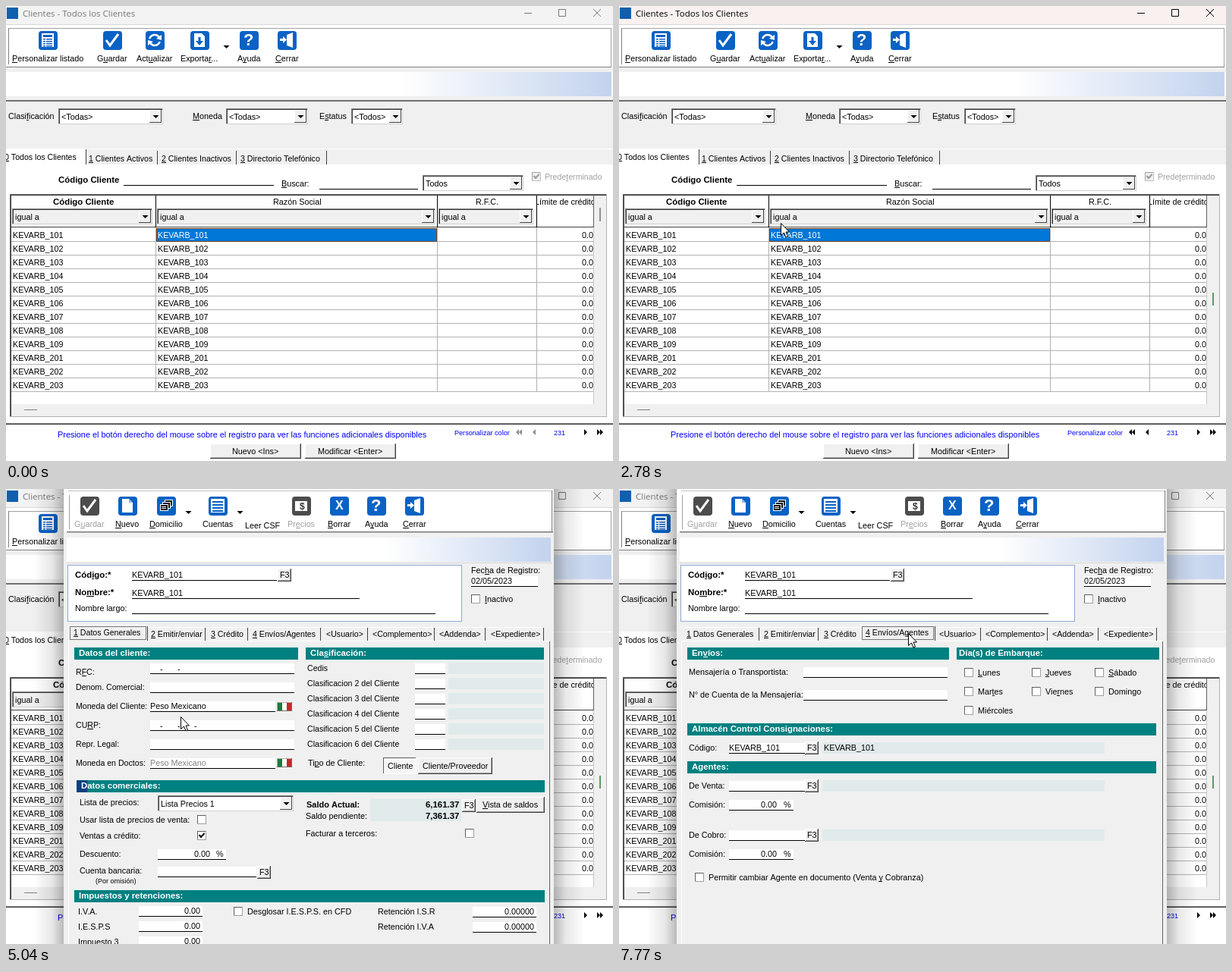
Animation of 800 by 600 pixels, one loop 8 s. Source, as an HTML page with a canvas:

```html
<!DOCTYPE html>
<html lang="es">
<head>
<meta charset="utf-8">
<title>Clientes</title>
<style>
html, body { margin: 0; width: 100%; height: 100%; overflow: hidden; background: #fff; }
canvas { display: block; }
</style>
</head>
<body>
<canvas id="stage" width="800" height="600"></canvas>
<script>
const g = document.getElementById('stage').getContext('2d');
const LOOP = 8000, GRAY = '#f0f0f0', TEAL = '#008080', BLUE = '#0a62c4', PALE = '#e0eaea';
const SANS = '"Liberation Sans", Arial, sans-serif';
const CODE = 'KEVARB_101';

// ---- primitives ----
function box(x, y, w, h, c) { g.fillStyle = c; g.fillRect(x, y, w, h); }
function hline(x1, x2, y, c = '#000') { box(x1, y, x2 - x1, 1, c); }
function vline(x, y1, y2, c = '#000') { box(x, y1, 1, y2 - y1, c); }
function poly(points, c) {
  g.beginPath();
  points.forEach(p => g.lineTo(...p));
  g.closePath();
  g.fillStyle = c;
  g.fill();
}
function stroke(c, w, path) {
  g.strokeStyle = c; g.lineWidth = w;
  g.beginPath(); path(); g.stroke();
}
// y is the middle of the line; "&" underlines the next letter
function text(s, x, y, o = {}) {
  const { c = '#000', size = 10.8, bold, align = 0, face = SANS } = o;
  g.font = `${bold ? 'bold ' : ''}${bold && !o.size ? 11.4 : size}px ${face}`;
  g.fillStyle = c;
  const mark = s.indexOf('&'), plain = s.replace('&', '');
  x = Math.round(x - g.measureText(plain).width * align);
  g.fillText(plain, x, y + 4);
  if (mark >= 0) {
    const left = g.measureText(plain.slice(0, mark)).width;
    box(Math.round(x + left), y + 5, Math.round(g.measureText(plain[mark]).width), 1, c);
  }
}
function bevel(x, y, w, h, light, dark, fill) {
  box(x, y, w, h, dark);
  box(x, y, w - 1, h - 1, light);
  box(x + 1, y + 1, w - 2, h - 2, fill);
}
function dotted(x, y, w, h, c = '#000') {
  g.setLineDash([1, 1]);
  stroke(c, 1, () => g.rect(x + .5, y + .5, w - 1, h - 1));
  g.setLineDash([]);
}
function clip(x, y, w, h, draw) {
  g.save();
  g.beginPath(); g.rect(x, y, w, h); g.clip();
  draw();
  g.restore();
}

// ---- widgets ----
function button(s, x, y, w, h) {
  bevel(x, y, w, h, '#fff', '#404040', GRAY);
  hline(x + 1, x + w - 1, y + h - 2, '#a0a0a0');
  vline(x + w - 2, y + 1, y + h - 1, '#a0a0a0');
  text(s, x + w / 2, y + (h >> 1), { align: .5 });
}
function f3(x, y) { button('F3', x, y, 18, 17); }
function arrowDown(x, y, r = 4) { poly([[x - r, y], [x + r, y], [x, y + r]], '#000'); }
function combo(s, x, y, w, fill = '#fff') {
  const h = 21;
  bevel(x, y, w, h, '#808080', '#d0d0d0', '#404040');
  box(x + 2, y + 2, w - 3, h - 3, fill);
  bevel(x + w - 18, y + 2, 16, h - 4, '#fff', '#404040', GRAY);
  arrowDown(x + w - 9.5, y + 9);
  text(s, x + 4, y + 11);
}
function check(x, y, on, c = '#000') {
  bevel(x, y, 12, 12, '#606060', '#a0a0a0', '#fff');
  if (on) stroke(c, 2, () => { g.moveTo(x + 2.5, y + 5); g.lineTo(x + 5, y + 8); g.lineTo(x + 9.5, y + 3); });
}
function checkLabel(s, x, y, on) { check(x, y - 6, on); text(s, x + 18, y); }
function field(x1, x2, y, s = '', right) {
  box(x1, y - 13, x2 - x1, 13, '#fff');
  hline(x1, x2, y);
  if (s) text(s, right || x1, y - 7, { align: right ? 1 : 0 });
}
function heading(s, x1, x2, y) {
  box(x1, y, x2 - x1, 16, TEAL);
  text(s, x1 + 6, y + 7, { bold: 1, c: '#fff' });
}
function banner(x1, x2, y, from) {
  const f = g.createLinearGradient(from, 0, x2, 0);
  f.addColorStop(0, '#fff');
  f.addColorStop(1, '#c3d3ee');
  box(x1, y, x2 - x1, 32, f);
}

// ---- toolbar glyphs, centred on 0,0 ----
const glyphs = {
  list() {
    box(-8, -9, 16, 18, '#fff');
    box(-6, -7, 12, 3, BLUE);
    for (let y = -2; y < 8; y += 3) { box(-6, y, 3, 1.5, BLUE); box(-2, y, 8, 1.5, BLUE); }
  },
  check() { stroke('#fff', 3, () => { g.moveTo(-8, 0); g.lineTo(-3, 7); g.lineTo(8, -8); }); },
  refresh() {
    stroke('#fff', 2.5, () => g.arc(0, 0, 7, 3.4, 5.9));
    stroke('#fff', 2.5, () => g.arc(0, 0, 7, .3, 2.8));
    poly([[9, -7], [9, 0], [2, -2]], '#fff');
    poly([[-9, 7], [-9, 0], [-2, 2]], '#fff');
  },
  export() {
    poly([[-7, -9], [3, -9], [7, -5], [7, 9], [-7, 9]], '#fff');
    box(-1.5, -4, 3, 6, BLUE);
    poly([[-5, 1], [5, 1], [0, 7]], BLUE);
  },
  help() { text('?', 0, 3, { bold: 1, size: 22, c: '#fff', align: .5 }); },
  exit() {
    poly([[0, -7], [8, -10], [8, 10], [0, 7]], '#fff');
    box(-9, -2, 7, 3, '#fff');
    poly([[-5, -5], [0, -.5], [-5, 4]], '#fff');
  },
  page() {
    poly([[-7, -9], [2, -9], [7, -4], [7, 9], [-7, 9]], '#fff');
    poly([[2, -9], [2, -4], [7, -4]], '#8fb6e6');
  },
  cards() {
    for (let i = 0; i < 3; i++) bevel(-2 - i * 3, -8 + i * 3, 11, 9, '#fff', '#fff', '#111');
    box(-6, 1, 6, 1, '#fff'); box(-6, 3, 6, 1, '#fff');
  },
  lines() {
    box(-9, -9, 18, 18, '#fff');
    for (let y = -6; y < 8; y += 4) box(-7, y, 14, 2, BLUE);
  },
  money() {
    box(-8, -6, 16, 13, '#fff');
    text('$', 1, 1, { bold: 1, size: 12, c: '#333', align: .5 });
  },
  cross() { text('X', 0, 1, { bold: 1, size: 16, c: '#fff', align: .5 }); }
};
function tool(kind, label, x, y, o = {}) {
  g.save();
  g.translate(x, y);
  g.fillStyle = o.off ? '#4c4c4c' : BLUE;
  g.beginPath(); g.roundRect(-12, -12, 25, 25, 4); g.fill();
  glyphs[kind]();
  g.restore();
  text(label, x, y + 24, { align: .5, c: o.off ? '#a0a0a0' : '#000' });
}

// ---- main window ----
function mainWindow(active, clicked) {
  const ink = active ? '#000' : '#777';
  box(0, 0, 800, 600, '#fff');
  box(0, 0, 800, 24, active ? '#f8f1f0' : '#f3f3f3');
  box(1, 2, 15, 15, '#0f5fae');
  text('Clientes - Todos los Clientes', 22, 10, { size: 11.5, c: ink, face: '"Open Sans", sans-serif' });
  hline(683, 693, 9, ink);
  stroke(ink, 1, () => {
    g.rect(728.5, 4.5, 9, 9);
    g.moveTo(774, 4); g.lineTo(784, 14);
    g.moveTo(784, 4); g.lineTo(774, 14);
  });

  hline(0, 800, 24, '#d8d8d8');
  hline(3, 797, 29, '#a0a0a0');
  vline(3, 29, 77, '#808080');
  vline(797, 29, 80, '#a0a0a0');
  hline(0, 798, 80, '#808080');
  box(0, 81, 800, 6, GRAY);
  tool('list', '&Personalizar listado', 55, 45);
  tool('check', 'G&uardar', 140, 45);
  tool('refresh', 'Act&ualizar', 196, 45);
  tool('export', 'Exporta&r...', 255, 45);
  arrowDown(290.5, 52);
  tool('help', 'A&yuda', 320, 45);
  tool('exit', '&Cerrar', 370, 45);
  banner(0, 798, 87, 520);
  box(0, 119, 800, 5, GRAY);
  box(0, 124, 800, 2, '#707070');

  box(0, 126, 800, 84, GRAY);
  text('Clasi&ficación', 3, 145);
  combo('<Todas>', 69, 135, 138);
  text('&Moneda', 246, 145);
  combo('<Todas>', 290, 135, 108);
  text('E&status', 413, 145);
  combo('<Todos>', 455, 135, 68);

  hline(0, 800, 188, '#fff');
  box(0, 188, 106, 22, '#fff');
  vline(105, 189, 209, '#404040');
  const size = 10.6;
  text('&0 Todos los Clientes', -2, 199, { size });
  [['&1 Clientes Activos', 109, 199], ['&2 Clientes Inactivos', 205, 303], ['&3 Directorio Telefónico', 309, 422]]
    .forEach(([s, x, end]) => { text(s, x, 201, { size }); vline(end, 191, 209, '#404040'); });
  hline(106, 800, 209, '#fff');

  text('Código Cliente', 69, 229, { bold: 1 });
  hline(155, 353, 236);
  text('&Buscar:', 363, 234);
  hline(413, 543, 241);
  combo('Todos', 549, 223, 133);
  bevel(693, 219, 12, 12, '#a0a0a0', '#c0c0c0', GRAY);
  stroke('#999', 2, () => { g.moveTo(695.5, 224); g.lineTo(698, 227); g.lineTo(702.5, 222); });
  text('Prede&terminado', 710, 225, { c: '#a0a0a0', size });

  grid(clicked);
  hline(0, 800, 550, '#808080');
  hline(0, 800, 551, '#404040');
  const blue = { c: '#0000ff' };
  text('Presione el botón derecho del mouse sobre el registro para ver las funciones adicionales disponibles', 68, 565, { ...blue, size: 10.9 });
  text('Personalizar color', 591, 562, { ...blue, size: 9.1 });
  text('231', 722, 562, { ...blue, size: 9 });
  const nav = (x, dir, c) => poly([[x, 558], [x + 4 * dir, 562], [x, 566]], c);
  const back = clicked ? '#000' : '#909090';
  nav(676, -1, back); nav(680, -1, back); nav(698, -1, back);
  nav(762, 1, '#000'); nav(779, 1, '#000'); nav(783, 1, '#000');
  button('Nuevo <Ins>', 269, 577, 120, 20);
  button('Modificar <Enter>', 394, 577, 120, 20);
}

function grid(clicked) {
  bevel(5, 248, 787, 294, '#606060', '#b0b0b0', '#fff');
  hline(6, 791, 249, '#404040');
  vline(6, 249, 541, '#404040');
  box(775, 250, 16, 291, GRAY);
  box(7, 525, 784, 16, GRAY);
  text('Código Cliente', 102, 258, { bold: 1, align: .5 });
  text('Razón Social', 384, 258, { align: .5 });
  text('R.F.C.', 634, 258, { align: .5 });
  clip(700, 250, 74, 270, () => {
    text('Límite de crédito', 737, 258, { align: .5 });
    for (let i = 0; i < 12; i++) text('0.00', 759, 302 + i * 18);
  });
  [[8, 185], [199, 367], [570, 125]].forEach(([x, w]) => combo('igual a', x, 267, w, GRAY));
  hline(7, 775, 291, '#404040');
  [197, 568, 699].forEach(x => { vline(x, 250, 292, '#000'); vline(x, 292, 509, '#b0b0b0'); });
  vline(774, 250, 292, '#606060');
  for (let i = 0; i < 12; i++) hline(7, 774, 310 + i * 18, '#b4b4b4');
  bevel(198, 293, 370, 18, '#000', '#000', '#0078d7');
  dotted(198, 293, 370, 18, '#ff8728');
  for (let i = 0; i < 12; i++) {
    const name = 'KEVARB_' + (i < 9 ? 101 + i : 192 + i), y = 302 + i * 18;
    text(name, 9, y, { size: 10.7 });
    text(name, 200, y, { size: 10.7, c: i ? '#000' : '#fff' });
  }
  vline(774, 292, 525, '#c8c8c8');
  hline(24, 41, 532, '#808080');
  if (clicked) box(782, 378, 2, 17, '#5a9a62');
  else box(782, 266, 2, 18, '#909090');
}

// ---- customer dialog ----
function shadow() {
  [[76, 36], [722, 762]].forEach(([x1, x2]) => {
    const f = g.createLinearGradient(x1, 0, x2, 0);
    f.addColorStop(0, 'rgba(0,0,0,.27)');
    f.addColorStop(.4, 'rgba(0,0,0,.09)');
    f.addColorStop(1, 'rgba(0,0,0,0)');
    box(Math.min(x1, x2), 0, 40, 600, f);
  });
}
function dialogTools() {
  vline(83, 8, 53, '#a0a0a0');
  tool('check', 'G&uardar', 110, 22, { off: 1 });
  tool('page', '&Nuevo', 160, 22);
  tool('cards', '&Domicilio', 211, 22);
  arrowDown(240.5, 29);
  tool('lines', 'Cuentas', 279, 22);
  arrowDown(308.5, 29);
  text('Leer CSF', 338, 48, { align: .5 });
  tool('money', 'Pr&ecios', 389, 22, { off: 1 });
  tool('cross', '&Borrar', 439, 22);
  tool('help', 'A&yuda', 488, 22);
  tool('exit', '&Cerrar', 538, 22);
}
function blankDialog() {
  shadow();
  box(76, 0, 646, 600, '#fff');
  box(85, 204, 629, 396, '#efefee');
  dialogTools();
}
function dialogHead() {
  box(76, 0, 646, 600, GRAY);
  box(77, 0, 643, 57, '#fff');
  hline(82, 720, 2, '#c0c0c0');
  vline(719, 2, 57, '#808080');
  hline(80, 721, 56, '#707070');
  hline(80, 721, 57, '#c0c0c0');
  dialogTools();
  banner(80, 718, 64, 500);
  hline(80, 720, 97, '#d8d8d8');
  bevel(81, 100, 520, 75, '#8fa9d4', '#8fa9d4', '#fff');
  text('Cód&igo:*', 91, 113, { bold: 1 });
  field(166, 357, 120, CODE);
  f3(358, 105);
  text('No&mbre:*', 91, 136, { bold: 1 });
  field(166, 466, 144, CODE);
  text('Nombre largo:', 91, 157);
  field(166, 566, 164);
  text('Fec&ha de Registro:', 613, 107);
  field(613, 701, 128, '02/05/2023');
  checkLabel('&Inactivo', 613, 145);
}

const tabs = [
  ['&1 Datos Generales', 89, 185], ['&2 Emitir/enviar', 191, 263], ['&3 Crédito', 270, 319],
  ['&4 Envíos/Agentes', 325, 415], ['<Usuario>', 422, 477], ['<Complemento>', 483, 565],
  ['<Addenda>', 571, 632], ['<Expediente>', 639, 709]
];
function dialogTabs(sel) {
  hline(82, 717, 200, '#fff');
  vline(82, 200, 600, '#fff');
  vline(716, 201, 600, '#606060');
  tabs.forEach(([s, x, end], i) => {
    const on = i === sel;
    if (on) {
      box(x - 7, 179, end - x + 9, 22, GRAY);
      hline(x - 6, end, 179, '#fff');
      vline(x - 7, 180, 201, '#fff');
      vline(end + 1, 181, 200, '#404040');
      dotted(x - 5, 181, end - x + 5, 18);
    } else {
      vline(end - 1, 183, 200, '#404040');
      hline(x - 4, end - 2, 182, '#fff');
    }
    text(s, x, on ? 189 : 191, { size: 10.6 });
  });
}

function flag(x, y) {
  bevel(x, y, 20, 12, '#b0b0a0', '#707060', '#fff');
  box(x + 1, y + 1, 6, 10, '#1c7a3c');
  box(x + 13, y + 1, 6, 10, '#c62828');
}
function generalPage() {
  heading('Datos del cliente:', 90, 385, 209);
  [['R&FC:', 380], ['Denom. Comercial:', 380], ['Moneda del Cliente:', 355], ['CU&RP:', 380],
   ['Repr. Legal:', 380], ['Moneda en Doctos:', 355]].forEach(([s, end], i) => {
    text(s, 92, i ? 236 + 25 * i : 241, { size: 10.6 });
    field(190, end, 243 + 25 * i);
  });
  [[203, 237], [226, 237], [203, 312], [226, 312], [248, 312]].forEach(([x, y]) => text('-', x, y));
  text('Peso Mexicano', 190, 286);
  text('Peso Mexicano', 190, 361, { c: '#808080' });
  flag(357, 281);
  flag(357, 355);

  heading('Cla&sificación:', 395, 709, 209);
  for (let i = 0; i < 6; i++) {
    const y = 236 + 20 * i;
    text(i ? `Clasificacion ${i + 1} del Cliente` : 'Cedis', 397, y, { size: 10.6 });
    field(539, 579, y + 7);
    box(583, y - 7, 126, 15, PALE);
  }
  text('Ti&po de Cliente:', 398, 361);
  bevel(497, 354, 44, 22, '#606060', '#fff', '#f6f6f6');
  text('Cliente', 520, 365, { align: .5 });
  button('Cliente/Proveedor', 543, 354, 98, 22);

  heading('', 93, 710, 384);
  box(93, 384, 14, 16, '#0a4080');
  text('Datos comerciales:', 99, 391, { bold: 1, c: '#fff' });
  text('Lista de precios:', 97, 413);
  combo('Lista Precios 1', 200, 404, 179);
  text('Usar lista de precios de venta:', 97, 436);
  check(252, 430);
  text('Ventas a crédito:', 97, 457);
  check(252, 451, 1);
  text('Descuento:', 97, 481);
  field(200, 290, 488, '0.00', 269);
  text('%', 277, 481);
  text('Cuenta bancaria:', 97, 503);
  field(200, 330, 511);
  f3(331, 497);
  text('(Por omisión)', 118, 516, { size: 9 });
  text('Saldo Actual:', 396, 416, { bold: 1, size: 11 });
  text('Saldo pendiente:', 395, 431);
  box(480, 409, 120, 29, PALE);
  text('6,161.37', 597, 416, { bold: 1, align: 1 });
  text('7,361.37', 597, 431, { bold: 1, align: 1 });
  f3(601, 409);
  button('&Vista de saldos', 620, 406, 90, 21);
  text('Facturar a terceros:', 395, 454);
  check(605, 448);

  heading('Impuestos y retenciones:', 90, 710, 529);
  ['I.V.A.', 'I.E.S.P.S', 'Impuesto 3'].forEach((s, i) => {
    text(s, 95, 557 + 20 * i);
    field(175, 259, 563 + 20 * i, '0.00', 256);
  });
  checkLabel('Desglosar I.E.S.P.S. en CFD', 300, 557);
  ['Retención I.S.R', 'Retención I.V.A'].forEach((s, i) => {
    text(s, 490, 557 + 20 * i);
    field(615, 699, 564 + 20 * i, '0.00000', 696);
  });
}
function shippingPage() {
  heading('En&víos:', 90, 435, 209);
  text('Mensajería o Transportista:', 92, 241);
  field(243, 433, 248);
  text('N° de Cuenta de la Mensajería:', 92, 271);
  field(243, 433, 278);
  heading('', 445, 712, 209);
  text('Día(s) de Embarque:', 448, 216, { bold: 1, c: '#fff' });
  ['&Lunes', 'Mar&tes', 'Miércoles', '&Jueves', 'Vie&rnes', '', '&Sábado', 'Domingo'].forEach((s, i) => {
    if (s) checkLabel(s, [455, 544, 627][i / 3 | 0], 242 + 25 * (i % 3));
  });
  heading('Almacén Control Consignaciones:', 90, 708, 309);
  text('Código:', 92, 341);
  heading('Agentes:', 90, 708, 359);
  [[341, CODE], [391, ''], [456, '']].forEach(([y, s]) => {
    field(145, 245, y + 7, s);
    f3(245, y - 8);
    box(268, y - 7, 372, 15, PALE);
    if (s) text(s, 270, y);
  });
  [['De Venta:', 391], ['De Cobro:', 456]].forEach(([s, y]) => {
    text(s, 92, y);
    text('Comisión:', 92, y + 25);
    field(145, 230, y + 32, '0.00', 208);
    text('%', 217, y + 25);
  });
  checkLabel('Permitir cambiar Agente en documento (Venta &y Cobranza)', 100, 512);
}

// ---- pointer: time, x, y ----
const path = [
  [1070, 441, 567], [1310, 241, 296], [1510, 241, 296], [1650, 227, 297], [1840, 227, 297], [1850, 226, 299],
  [2050, 226, 299], [2180, 227, 314], [2260, 227, 314], [2780, 213, 286], [2890, 213, 286], [2900, 225, 290],
  [3110, 226, 297], [3250, 218, 289], [3710, 230, 300], [5640, 230, 300], [5980, 234, 202], [6230, 234, 202],
  [6650, 459, 193], [6850, 459, 193], [7110, 381, 190], [LOOP, 381, 190]
];
function pointer(t) {
  if (t < path[0][0]) return;
  const i = path.findIndex(p => p[0] > t), [t0, x0, y0] = path[i - 1], [t1, x1, y1] = path[i];
  const k = (t - t0) / (t1 - t0);
  g.save();
  g.translate(Math.round(x0 + (x1 - x0) * k) + .5, Math.round(y0 + (y1 - y0) * k) + .5);
  poly([[0, 0], [0, 16], [4, 12.5], [6.5, 18.5], [9, 17.5], [6.5, 11.5], [11, 11.5]], '#fff');
  g.lineJoin = 'round';
  g.strokeStyle = '#000';
  g.lineWidth = 1;
  g.stroke();
  g.restore();
}

function draw(now) {
  const t = now % LOOP, clicked = t >= 2500;
  mainWindow(clicked && t < 4650, clicked);
  if (t >= 4650) {
    g.globalAlpha = t < 4730 ? .6 : 1;
    if (t < 4780) blankDialog();
    else {
      shadow();
      dialogHead();
      const sel = t < 7650 ? 0 : 3;
      dialogTabs(sel);
      if (t >= 4860) sel ? shippingPage() : generalPage();
    }
    g.globalAlpha = 1;
  }
  pointer(t);
}
const start = performance.now();
function tick() {
  draw(performance.now() - start);
  requestAnimationFrame(tick);
}
tick();
</script>
</body>
</html>
```
